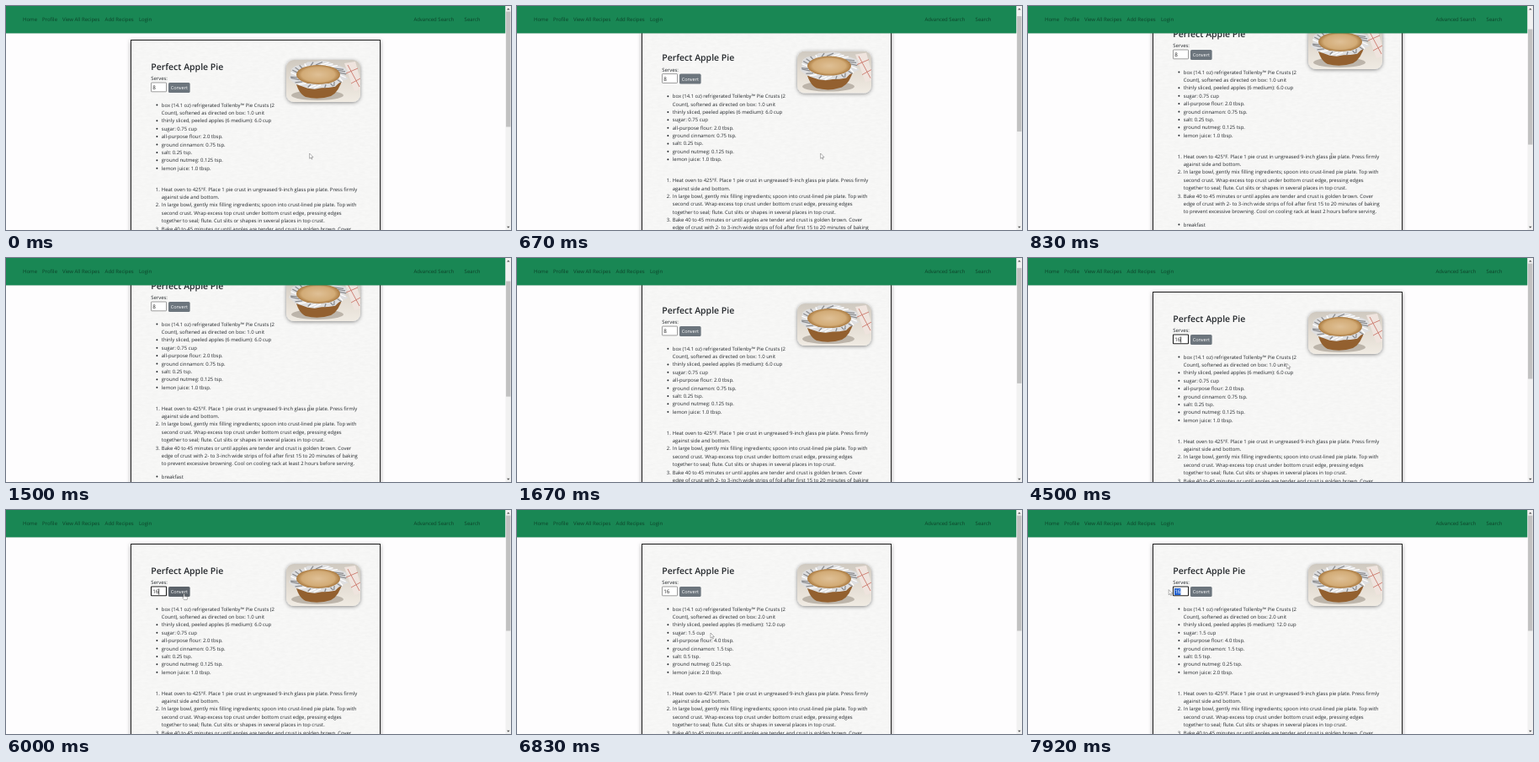
An HTML page that plays this animation: 600x266 px, repeating every 8000 ms.

```html
<!DOCTYPE html>
<html lang="en">
<head>
<meta charset="utf-8">
<title>Recipe converter</title>
<style>
html, body { margin: 0; width: 100%; height: 100%; overflow: hidden; background: #fefdfe; }
svg { display: block; width: 600px; height: 266px; }
text {
  font: 5.95px "Open Sans", "Noto Sans", sans-serif;
  fill: #24282c;
  text-rendering: geometricPrecision;
}
text.title { font-size: 10.5px; font-weight: 600; }
text.btn { font-size: 5.5px; fill: #fff; }
text.nav { font-size: 6px; fill: #0d4229; }
text.value { font-size: 6.3px; }
</style>
</head>
<body>
<svg viewBox="0 0 600 266" xmlns="http://www.w3.org/2000/svg">
  <defs>
    <filter id="cardShadow" x="-10%" y="-10%" width="120%" height="120%">
      <feDropShadow dx="0" dy="1" stdDeviation="2.6" flood-opacity=".5"/>
    </filter>
    <filter id="photoShadow" x="-20%" y="-20%" width="140%" height="150%">
      <feDropShadow dx="0" dy="1" stdDeviation="2" flood-opacity=".45"/>
    </filter>
    <filter id="paper" x="0" y="0" width="100%" height="100%">
      <feTurbulence type="fractalNoise" baseFrequency=".15 .4" numOctaves="2" seed="4"/>
      <feColorMatrix values="0 0 0 0 .5  0 0 0 0 .5  0 0 0 0 .5  .12 0 0 0 -.03"/>
    </filter>
    <linearGradient id="table" x1="0" y1="0" x2="0" y2="1">
      <stop offset="0" stop-color="#cfc9c0"/>
      <stop offset=".5" stop-color="#e3dcd2"/>
      <stop offset="1" stop-color="#f0ebe3"/>
    </linearGradient>
    <radialGradient id="crust">
      <stop offset="0" stop-color="#dfc096"/>
      <stop offset=".75" stop-color="#d2ab76"/>
      <stop offset="1" stop-color="#a9793f"/>
    </radialGradient>
    <clipPath id="photoClip"><rect x="333" y="64" width="88" height="50" rx="9"/></clipPath>
  </defs>

  <g id="page">
    <rect x="148.5" y="40.5" width="296" height="400" fill="#f8f8f7" filter="url(#cardShadow)"/>
    <rect x="148.5" y="40.5" width="296" height="400" filter="url(#paper)"/>
    <rect x="148.5" y="40.5" width="296" height="400" fill="none" stroke="#222"/>

    <rect x="333" y="64" width="88" height="50" rx="9" fill="#ddd" filter="url(#photoShadow)"/>
    <g id="photo" clip-path="url(#photoClip)">
      <rect x="333" y="64" width="88" height="50" fill="url(#table)"/>
      <path d="M402 68L415 66L424 98L414 101Z" fill="#efe4de"/>
      <path d="M406 70L420 96M404 80L418 74M410 92L421 86" stroke="#cf8478" fill="none"/>
      <ellipse cx="370" cy="106" rx="31" ry="6" fill="#8d8478" opacity=".5"/>
      <path d="M343 86Q347 104 356 108Q371 112 386 107Q396 102 400 85Z" fill="#93602f"/>
    </g>

    <rect id="box" x="172.5" y="91" width="18" height="10.8" rx=".6" fill="#fff"/>
    <rect id="sel" y="93" height="8" fill="#2463d1"/>
    <rect id="caret" y="93.4" width=".7" height="7.2"/>
    <rect id="button" x="193" y="91" width="25.6" height="12" rx="1.6"/>
  </g>

  <g id="chrome">
    <rect width="593.5" height="33.2" opacity=".07"/>
    <rect width="593.5" height="32.4" fill="#198754"/>
    <rect x="593.5" width="6.5" height="266" fill="#f1f1f1"/>
    <path d="M595 4.4L596.8 2.4L598.6 4.4ZM595 261.8L596.8 263.8L598.6 261.8Z" fill="#505050"/>
    <rect id="thumb" x="594.1" width="5.3" height="137" fill="#c1c1c1"/>
  </g>

  <g id="cursor" fill="#fff" stroke="#444" stroke-width=".4" stroke-linejoin="round">
    <path id="arrow" d="M0 0V6.2L1.5 4.9L2.5 7L3.4 6.6L2.5 4.5H4.4Z"/>
    <path id="beam" d="M-1 0H1M0 0V6M-1 6H1"/>
    <path id="hand" d="M0 0Q.8 -.5 1.2 .3V2.8L4.2 3.4Q4.9 3.7 4.7 4.7L4.1 7H.6L-1.5 4.4Q-1.3 3.3 -.1 4.2Z"/>
  </g>
</svg>

<script>
const LOOP = 8000, TICK = 1000 / 12, LINE = 9.38;
const $ = id => document.getElementById(id);

function add(parent, tag, attrs, content = "") {
  const el = document.createElementNS("http://www.w3.org/2000/svg", tag);
  for (const k in attrs) el.setAttribute(k, attrs[k]);
  el.textContent = content;
  return $(parent).appendChild(el);
}
const label = (parent, x, y, content, cls = "", anchor = "start") =>
  add(parent, "text", { x, y, class: cls, "text-anchor": anchor }, content);
const bullet = y => add("page", "circle", { cx: 179.4, cy: y - 2, r: 1, fill: "#24282c" });
const set = (id, attrs) => { for (const k in attrs) $(id).setAttribute(k, attrs[k]); };
const show = (id, on) => set(id, { visibility: on ? "visible" : "hidden" });

// Crumpled foil around the crust
let seed = 7;
const rnd = () => (seed = seed * 16807 % 2147483647) / 2147483647;
const rim = (a, r) => `${371 + Math.cos(a) * 34 * r} ${82 + Math.sin(a) * 16 * r}`;
const turns = Array.from({ length: 26 }, (_, i) => i * Math.PI / 13);
add("photo", "path", { d: "M" + turns.map(a => rim(a, 0.9 + rnd() * 0.2)).join("L") + "Z", fill: "#dededf" });
for (const a of turns) add("photo", "path", {
  d: `M${rim(a, 0.75)}L${rim(a + rnd() * 0.3, 0.98)}`,
  stroke: rnd() < 0.5 ? "#8b8c8f" : "#fff", "stroke-width": 1.3
});
add("photo", "ellipse", { cx: 371, cy: 81.5, rx: 26, ry: 11.5, fill: "url(#crust)" });

// Navigation
[[20, "Home"], [43, "Profile"], [67, "View All Recipes"], [117.6, "Add Recipes"],
 [158, "Login"], [484.4, "Advanced Search"], [544.6, "Search"]]
  .forEach(([x, name]) => label("chrome", x, 18, name, "nav"));

// Recipe
label("page", 172.2, 75.8, "Perfect Apple Pie", "title");
label("page", 172.2, 88.2, "Serves:");
label("page", 205.8, 99, "Convert", "btn", "middle");
const value = label("page", 174.2, 99.2, "8", "value");

const parts = [
  ["box (14.1 oz) refrigerated Tollenby™ Pie Crusts (2|Count), softened as directed on box", 1, "unit"],
  ["thinly sliced, peeled apples (6 medium)", 6, "cup"],
  ["sugar", 0.75, "cup"],
  ["all-purpose flour", 2, "tbsp."],
  ["ground cinnamon", 0.75, "tsp."],
  ["salt", 0.25, "tsp."],
  ["ground nutmeg", 0.125, "tsp."],
  ["lemon juice", 1, "tbsp."]
];
let y = 119.6;
const amounts = parts.map(([name, qty, unit]) => {
  const lines = name.split("|"), last = lines.pop();
  bullet(y);
  for (const line of lines) { label("page", 184.8, y, line); y += LINE; }
  const el = label("page", 184.8, y, "");
  y += LINE;
  return { el, last, qty, unit };
});

const steps = [
  "Heat oven to 425°F. Place 1 pie crust in ungreased 9-inch glass pie plate. Press firmly|against side and bottom.",
  "In large bowl, gently mix filling ingredients; spoon into crust-lined pie plate. Top with|second crust. Wrap excess top crust under bottom crust edge, pressing edges|together to seal; flute. Cut slits or shapes in several places in top crust.",
  "Bake 40 to 45 minutes or until apples are tender and crust is golden brown. Cover|edge of crust with 2- to 3-inch wide strips of foil after first 15 to 20 minutes of baking|to prevent excessive browning. Cool on cooling rack at least 2 hours before serving."
];
y = 219.6;
steps.forEach((step, i) => {
  label("page", 182.8, y, i + 1 + ".", "", "end");
  for (const line of step.split("|")) { label("page", 184.8, y, line); y += LINE; }
});
bullet(300.6);
label("page", 184.8, 300.6, "breakfast");

// Motion
const ease = (t, from, to) => {
  const p = Math.min(1, Math.max(0, (t - from) / (to - from)));
  return p * p * (3 - 2 * p);
};

// Two wheel notches down, two up
const scrollAt = t => 39 * (ease(t, 583, 833) + ease(t, 917, 1250) - ease(t, 1250, 1500) - ease(t, 1500, 1750));

// Pointer glides: from, to, x, y
const glides = [
  [1750, 2083, 181, 94], [2333, 2550, 168, 94.6],
  [3500, 3833, 250, 205], [3833, 4167, 393, 122],
  [4250, 4600, 287, 126], [4917, 5583, 224, 148], [5667, 5950, 211, 99.6],
  [6500, 6833, 230, 146], [6833, 7167, 181, 94], [7333, 7500, 167.2, 94.6]
];
function mouseAt(t) {
  let x = 360.6, y = 175;
  for (const [from, to, nx, ny] of glides) {
    const p = ease(t, from, to);
    x += (nx - x) * p;
    y += (ny - y) * p;
  }
  return [x, y];
}

const inside = (x, y, l, t, r, b) => x >= l && x <= r && y >= t && y <= b;
const amountText = n => Number.isInteger(n) ? n.toFixed(1) : String(n);

function draw(time) {
  const t = Math.floor((time + 5) / TICK) * TICK + 1;

  const scroll = scrollAt(t);
  set("page", { transform: `translate(0 ${-scroll})` });
  set("thumb", { y: 6.5 + scroll * 0.54 });

  const [x, my] = mouseAt(t);
  const overButton = inside(x, my, 193, 91, 219, 103);
  const overText = inside(x, my, 172, 91, 191, 102) || (t > 830 && t < 1580);
  const hidden = t > 1580 && t < 1830;
  set("cursor", { transform: `translate(${x} ${my})` });
  show("hand", overButton);
  show("beam", overText);
  show("arrow", !overButton && !overText && !hidden);
  set("button", { fill: overButton ? "#5c636a" : "#6c757d" });

  const focus = (t > 2250 && t < 6250) || t > 7330;
  set("box", { stroke: focus ? "#222" : "#767676", "stroke-width": focus ? 1.1 : 0.7 });

  // Dragging left selects from the end of the value to the pointer
  value.textContent = t < 2750 ? "8" : t < 3330 ? "1" : "16";
  const end = 174.2 + 3.6 * value.textContent.length;
  const left = Math.min(end, Math.max(174, x));
  const selected = left < end && ((t > 2400 && t < 2750) || t > 7400);
  show("sel", selected);
  set("sel", { x: left, width: end - left });
  value.style.fill = selected ? "#fff" : "#222";

  const blink = t < 3400 || (t - 3390) % 1060 < 530;
  show("caret", focus && !selected && blink);
  set("caret", { x: end });

  const factor = t < 6250 ? 1 : 2;
  for (const { el, last, qty, unit } of amounts)
    el.textContent = `${last}: ${amountText(qty * factor)} ${unit}`;
}

function frame() {
  draw(performance.now() % LOOP);
  requestAnimationFrame(frame);
}
frame();
</script>
</body>
</html>
```
